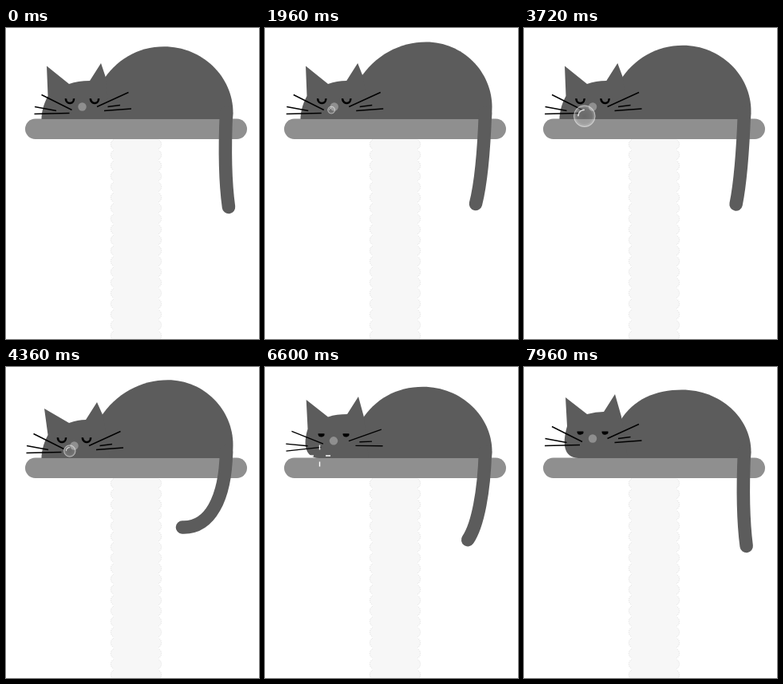
Animation, 317 px wide and 389 px high, one loop 8 s. Source, as an HTML page with a canvas:

```html
<!DOCTYPE html>
<html lang="en">
<head>
<meta charset="utf-8">
<title>Sleeping cat</title>
<style>
html, body { margin: 0; width: 100%; height: 100%; overflow: hidden; background: #fff; }
canvas { display: block; }
</style>
</head>
<body>
<canvas id="stage"></canvas>
<script>
const W = 317, H = 389, LOOP = 8000, POP = 6560;
const FUR = '#5c5c5c', GREY = '#8f8f8f';
const canvas = document.getElementById('stage');
const ctx = canvas.getContext('2d');
const dpr = window.devicePixelRatio || 1;
canvas.width = W * dpr;
canvas.height = H * dpr;
canvas.style.width = W + 'px';
canvas.style.height = H + 'px';

// Tracks are flat lists: time, value, time, value, ...
const bodyTop = [200, 23.2, 1250, 16.2, 1450, 16.2, 3400, 23.2, 4450, 16.2, 4650, 16.2, 6440, 22.8, 6860, 28.4];
const faceX = [160, 95.5, 1200, 86.5, 2800, 87, 4360, 85.5, 5520, 85.5, 6600, 86];
const headTurn = [160, 0, 1200, -4, 1500, -4, 2800, 0, 3300, 0, 4360, -5, 5520, -5, 6600, -2, 6860, -5];
const tailCurl = [160, 0, 1240, 1, 1300, 1, 2020, .24, 3000, 0, 3400, 0, 4440, 1, 4500, 1, 5220, .24, 5900, 0, 6150, 0, 6960, .72, 7240, .72, 8000, 0];
const earTwitch = [4200, 0, 4360, 1, 4520, 0];
const bubbleSize = [1400, 0, 2950, 16, 3350, 16, 4420, 7.5, 4550, 7.5, 6000, 24];
const waking = [6400, 0, 6720, 1];
const flinch = [6480, 0, 6600, .085, 6860, 0];

function track(keys, t) {
  if (t <= keys[0]) return keys[1];
  for (let i = 2; i < keys.length; i += 2) {
    if (t < keys[i]) {
      const u = (t - keys[i - 2]) / (keys[i] - keys[i - 2]);
      return keys[i - 1] + (keys[i + 1] - keys[i - 1]) * u * u * (3 - 2 * u);
    }
  }
  return keys[keys.length - 1];
}

function stroke(color, width, cap = 'butt') {
  ctx.strokeStyle = color;
  ctx.lineWidth = width;
  ctx.lineCap = cap;
  ctx.stroke();
}

function disc(x, y, r, fill) {
  ctx.beginPath();
  ctx.arc(x, y, r, 0, 2 * Math.PI);
  ctx.fillStyle = fill;
  ctx.fill();
}

function line(x1, y1, x2, y2) {
  ctx.moveTo(x1, y1);
  ctx.lineTo(x2, y2);
}

function drawStand() {
  const step = 13.3;
  for (let y = 145.5; y < H + step; y += step) {
    ctx.beginPath();
    ctx.roundRect(131.5, y - step / 2, 63, step, step / 2);
    ctx.fillStyle = '#f7f7f7';
    ctx.fill();
    ctx.beginPath();
    ctx.arc(138, y, 6.6, Math.PI / 2, Math.PI * 1.5);
    ctx.moveTo(188, y - 6.6);
    ctx.arc(188, y, 6.6, -Math.PI / 2, Math.PI / 2);
    ctx.setLineDash([1, 1.4]);
    stroke('#cfcfcf', .8);
    ctx.setLineDash([]);
  }
  ctx.fillStyle = '#f7f7f7';
  ctx.fillRect(135, 139, 56, H);
  ctx.beginPath();
  ctx.roundRect(24, 113.5, 278, 25.5, 12.75);
  ctx.fillStyle = GREY;
  ctx.fill();
}

function drawBody(top) {
  const swell = Math.max(0, 23.2 - top);
  const x = 198 + swell * .7, side = 106 - swell * 1.2;
  const k = .45 * (side - top);
  ctx.beginPath();
  ctx.moveTo(100, 114);
  ctx.lineTo(120 - swell * .3, 68 - swell * .6);
  ctx.bezierCurveTo(137, 40 - swell, x - 33, top, x, top);
  ctx.bezierCurveTo(x + (284.5 - x) * .55, top, 284.5, top + k, 284.5, side);
  ctx.lineTo(284, 114);
  ctx.fillStyle = FUR;
  ctx.fill();
}

function drawTail(k) {
  ctx.beginPath();
  ctx.moveTo(276, 106);
  ctx.bezierCurveTo(274 + k, 150 + 15 * k, 275 - 20 * k, 195 + 7 * k, 279 - 59 * k, 224 - 24 * k ** 1.3);
  stroke(FUR, 16.5, 'round');
}

function drawHead(wake, turn, twitch) {
  const mix = (a, b) => a + (b - a) * wake;
  const round = Math.min(1, wake * 1.6);
  const corner = (a, b) => a + (b - a) * round;
  ctx.beginPath();
  ctx.moveTo(corner(44.5, 68), 114);
  ctx.bezierCurveTo(corner(44.5, 49), corner(108, 113), corner(46, 48), corner(97, 95), mix(52.5, 54), mix(85, 74));
  ctx.lineTo(51 + wake - 3 * twitch, mix(47.5, 38) + 4.5 * twitch);
  ctx.lineTo(79, mix(70, 59));
  ctx.quadraticCurveTo(90, mix(66, 56), 105 + turn, mix(66, 56));
  ctx.lineTo(119 + turn, mix(44, 34));
  ctx.lineTo(125 + turn * .6, 62);
  ctx.lineTo(130, 114);
  ctx.fillStyle = FUR;
  ctx.fill();
}

function drawWhiskers(side, angle) {
  ctx.save();
  ctx.translate(side * 15, 5);
  ctx.rotate(side * angle);
  ctx.beginPath();
  if (side < 0) {
    line(-36, -20, 2, -1);
    line(-44.5, -5, -17.5, 0);
    line(-45, 4, -1, 3);
  } else {
    line(3.5, -5, 43, -23);
    line(17, -5, 32.5, -7);
    line(12.5, 0, 46.5, -2.5);
  }
  stroke('#000', 1.4);
  ctx.restore();
}

function drawFace(x, y, awake, angle) {
  ctx.save();
  ctx.translate(x, y);
  for (const side of [-1, 1]) {
    ctx.beginPath();
    if (awake) {
      ctx.ellipse(side * 15.5, -8.2, 4, 3.4, 0, -.25, Math.PI + .25);
      ctx.fillStyle = '#000';
      ctx.fill();
    } else {
      ctx.arc(side * 15.5, -9.5, 5, -.15, Math.PI + .15);
      stroke('#000', 2.6);
    }
    drawWhiskers(side, angle);
  }
  disc(0, 0, 5.2, GREY);
  ctx.restore();
}

function drawBubble(x, y, r) {
  const shade = ctx.createRadialGradient(x, y, 0, x, y, r);
  shade.addColorStop(0, 'rgba(255,255,255,.08)');
  shade.addColorStop(.7, 'rgba(255,255,255,.14)');
  shade.addColorStop(1, 'rgba(255,255,255,.4)');
  disc(x, y, r, shade);
  ctx.beginPath();
  ctx.arc(x, y, r - .4, 0, 2 * Math.PI);
  stroke('rgba(255,255,255,.4)', .9);
  ctx.beginPath();
  ctx.arc(x, y, r * .58, Math.PI * 1.03, Math.PI * 1.47);
  stroke('rgba(255,255,255,.75)', r * .14, 'round');
}

function drawSparks(age) {
  const inner = 5 + age * 10, outer = 12 + age * 6;
  ctx.beginPath();
  for (const [dx, dy] of [[1, 0], [0, 1], [-1, 0], [0, -1]]) {
    line(68.5 + dx * inner, 111 + dy * inner, 68.5 + dx * outer, 111 + dy * outer);
  }
  stroke('#fff', 1.4);
}

function draw(t) {
  const wake = track(waking, t);
  const x = track(faceX, t), y = 98.5 - 9 * wake;
  const r = track(bubbleSize, t);
  ctx.setTransform(dpr, 0, 0, dpr, 0, 0);
  ctx.fillStyle = '#fff';
  ctx.fillRect(0, 0, W, H);
  drawStand();
  drawBody(track(bodyTop, t));
  drawTail(track(tailCurl, t));
  drawHead(wake, track(headTurn, t), track(earTwitch, t));
  drawFace(x, y, t >= POP, track(flinch, t));
  if (t < POP && r > .5) drawBubble(x - .75 * r, y + .86 * r, r);
  const age = (t - POP) / 160;
  if (age >= 0 && age < 1) drawSparks(age);
}

const start = performance.now();
function tick() {
  draw((performance.now() - start) % LOOP);
  requestAnimationFrame(tick);
}
tick();
</script>
</body>
</html>
```
